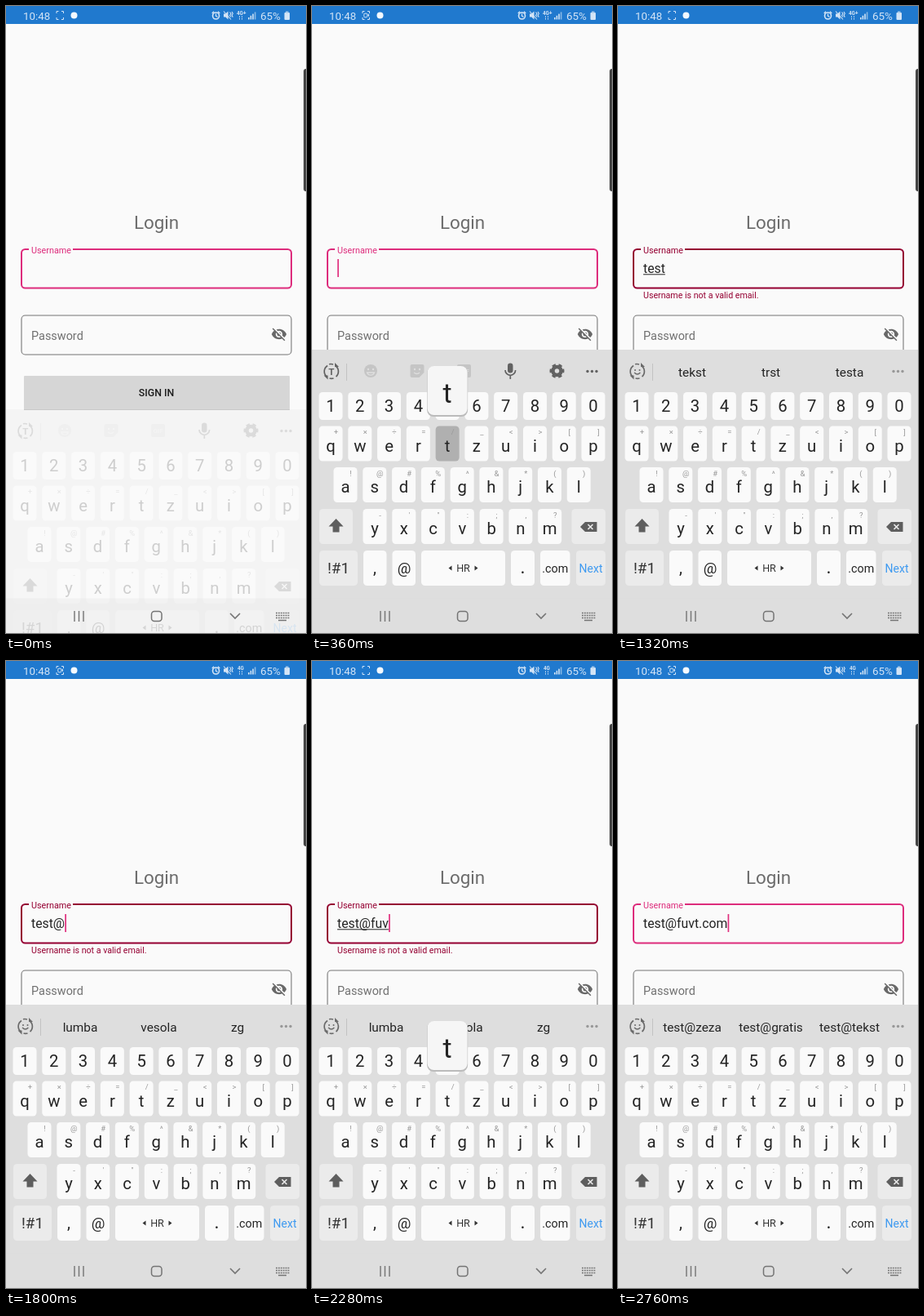
Recreate the animation shown at these times as an HTML page. Size 368 by 768 pixels, loop 2880 ms.

```html
<!DOCTYPE html>
<html lang="en">
<head>
<meta charset="utf-8">
<title>Login form</title>
<style>
html, body { margin: 0; width: 100%; height: 100%; overflow: hidden; background: #fafafa; }
svg { display: block; width: 368px; height: 768px; font-family: Roboto, sans-serif; }
</style>
</head>
<body>
<svg id="stage" viewBox="0 0 368 768" xmlns="http://www.w3.org/2000/svg"></svg>
<script>
const STEP = 120, STEPS = 24;
const PINK = '#dd2c7c', ERROR = '#950032', INK = '#242424', BOARD = '#dedede';

const rect = (x, y, w, h, fill, r = 0, more = '') =>
  `<rect x="${x}" y="${y}" width="${w}" height="${h}" rx="${r}" fill="${fill}" ${more}/>`;
const text = (s, x, y, size, fill, anchor = 'middle', more = '') =>
  `<text x="${x}" y="${y}" font-size="${size}" fill="${fill}" text-anchor="${anchor}" ${more}>${
    s.replace(/&/g, '&amp;').replace(/</g, '&lt;')}</text>`;
const line = (d, stroke, w = 1, more = '') =>
  `<path d="${d}" fill="none" stroke="${stroke}" stroke-width="${w}" ${more}/>`;
const shape = (d, fill, more = '') => `<path d="${d}" fill="${fill}" ${more}/>`;
const dot = (x, y, r, fill, more = '') => `<circle cx="${x}" cy="${y}" r="${r}" fill="${fill}" ${more}/>`;
const group = (id, body, more = '') => `<g id="${id}" ${more}>${body}</g>`;
const range = n => [...Array(n).keys()];

// Status bar
function statusBar() {
  const c = '#d3e4f6';
  return rect(0, 0, 368, 22, '#2079ce') +
    text('10:48', 21, 16.5, 13.3, c, 'start') +
    line('M62 9V6.5H64.5M68 6.5H70.5V9M70.5 14V16.5H68M64.5 16.5H62V14', c, 1) +
    group('cam', rect(63.8, 9.2, 4, 4.6, 'none', 1, `stroke="${c}"`) + shape('M68 11l2-1.5v4z', c)) +
    dot(83.5, 11.5, 4, '#f4f9ff') +
    dot(257.5, 12, 4, 'none', `stroke="${c}" stroke-width="1.6"`) +
    line('M257.5 9.5V12.2L259.5 13.5M252.7 9L255 6.8M262.3 9L260 6.8', c, 1.3) +
    shape('M267 9.5h2.3l3.2-3v10l-3.2-3H267z', c) +
    line('M267 6.5l9 10M274.5 7.5l1.5 2-1.5 2 1.5 2M277 7l1.3 2.2-1.3 2.2 1.3 2.2', c, 1.1) +
    text('4G+', 283, 11, 6.3, c, 'start', 'id="net" font-weight="700"') +
    line('M286.5 12.5V16.5M289.5 12.5V16.5', c, 1, 'stroke-dasharray="1.5 1"') +
    range(4).map(i => rect(297 + i * 2.6, 14 - i * 2.2, 1.6, 2.5 + i * 2.2, c, 0, i > 2 ? 'opacity=".6"' : '')).join('') +
    text('65%', 312, 16.5, 13.4, c, 'start') +
    rect(341.5, 8, 6.5, 9, c, 1) + rect(343, 6.5, 3.5, 2, '#9fc5ea');
}

// Form
const EYE = 'M12 7c2.8 0 5 2.2 5 5 0 .7-.1 1.3-.4 1.8l3 3c1.5-1.3 2.7-2.9 3.4-4.8-1.7-4.4-6-7.5-11-7.5' +
  '-1.4 0-2.7.2-4 .7l2.2 2.2C10.700 7.100 11.300 7 12 7zM2 4.300l2.700 2.700C3.100 8.300 1.800 10 1 12' +
  'c1.700 4.400 6 7.500 11 7.500 1.500 0 3-.3 4.400-.8L19.700 22 21 20.700 3.300 3z' +
  'M7.500 9.800l1.600 1.600c-.1.200-.1.400-.1.600 0 1.700 1.300 3 3 3 .2 0 .4 0 .6-.1l1.600 1.600' +
  'c-.7.300-1.400.500-2.200.500-2.800 0-5-2.200-5-5 0-.8.200-1.500.500-2.200zM11.800 9l3.200 3.200c.1-1.700-1.300-3.200-3.200-3.200z';

function form() {
  return rect(365, 77, 6, 150, '#444', 3) +
    text('Login', 184.5, 272.500, 22.4, '#6c6c6c') +
    rect(19, 298, 331, 47.500, 'none', 4.500, `id="box" stroke-width="2"`) +
    rect(28, 295, 54, 6, '#fafafa') +
    text('Username', 31, 303, 10.800, PINK, 'start', 'id="label"') +
    text('', 31, 327, 15.800, INK, 'start', 'id="value"') +
    rect(31, 328.300, 0, 1, INK, 0, 'id="under"') +
    rect(31, 310, 1.700, 22, '#e0307e', 0, 'id="caret"') +
    text('Username is not a valid email.', 31, 358, 10.650, ERROR, 'start', 'id="warn"') +
    rect(19, 379, 331, 48, 'none', 4.500, 'stroke="#777" stroke-width="1.1"') +
    text('Password', 31, 409, 14.450, '#707070', 'start') +
    shape(EYE, '#686868', 'transform="translate(325 392) scale(.83)"') +
    rect(22, 453, 326, 41.500, '#d6d6d6', 1) + rect(22, 494, 326, 1, '#c4c4c4') +
    text('SIGN IN', 184.500, 478, 12.300, '#1c1c1c', 'middle', 'font-weight="500"');
}

// Keyboard
const keys = {};

function key(name, x, y, w, h, fill = '#fafafa') {
  keys[name] = { cx: x + w / 2, y, w };
  return rect(x, y, w, h, fill, 4.500, `id="key-${name}"`);
}

function row(chars, hints, x0, y, h) {
  return [...chars].map((ch, i) => {
    const cx = x0 + i * 35.780;
    return key(ch, cx - 14.500, y, 29, h) +
      text(ch, cx, hints ? y + 31 : y + 24, 20.300, INK) +
      (hints ? text(hints[i], cx + 6.500, y + 10.500, 9.500, '#999') : '');
  }).join('');
}

const spinner = c =>
  line('M18 454a8.500 8.500 0 0 1 1-13.500M28.500 440.500a8.500 8.500 0 0 1 1 13.500', c, 1.700) +
  line('M21 438.800a8.500 8.500 0 0 1 5 .2M21.500 456a8.500 8.500 0 0 0 5 0', c, 1.700) +
  shape('M28 437v5h5zM19.500 457.500v-5h-5z', c);
const dots = c => [338, 343.500, 349].map(x => dot(x, 447.500, 1.700, c)).join('');

function tools() {
  const pale = '#c5c5c5', c = '#626262';
  return spinner(c) + text('T', 23.700, 452, 11.500, c, 'middle', 'font-weight="700"') +
    dot(72, 447, 8, pale) + dot(69, 445, 1.200, BOARD) + dot(75, 445, 1.200, BOARD) +
    line('M67.500 449a4.800 4.800 0 0 0 9 0z', BOARD, 1.300) +
    shape('M122.500 439h13a2 2 0 0 1 2 2v8l-6 6h-9a2 2 0 0 1-2-2v-12a2 2 0 0 1 2-2z', pale) +
    dot(126, 445, 1.200, BOARD) + dot(132, 445, 1.200, BOARD) + line('M125 449q4 3 7 0', BOARD, 1.300) +
    rect(178, 439, 17, 16, pale, 2) + text('GIF', 186.500, 450, 8, BOARD, 'middle', 'font-weight="700"') +
    rect(240, 437.500, 6.500, 12, c, 3.200) + line('M237 446a6.300 6.300 0 0 0 12.600 0M243.300 452v5', c, 1.700) +
    dot(300.500, 447, 5, 'none', `stroke="${c}" stroke-width="4.500"`) +
    dot(300.500, 447, 7.700, 'none', `stroke="${c}" stroke-width="2.600" stroke-dasharray="4.500 3.563" transform="rotate(-17 300.500 447)"`) +
    dots(c);
}

function suggestions() {
  const c = '#6a6a6a';
  return spinner(c) + dot(21, 446, 1, c) + dot(26.500, 446, 1, c) + line('M20 449q3.700 4 7.400 0', c, 1.300) +
    [91, 187.500, 284].map((x, i) => text('', x, 453.500, 15.400, INK, 'middle', `id="word${i}"`)).join('') +
    dots('#989898');
}

function keyboard() {
  const side = '#ebebeb', c = '#5e5e5e';
  return rect(0, 421, 368, 347, BOARD) + line('M42.500 438V459', '#c2c2c2') +
    group('tools', tools()) + group('words', suggestions()) +
    row('1234567890', '', 23, 473, 34) +
    row('qwertzuiop', '+×÷=/_<>[]', 23, 514.500, 43) +
    row('asdfghjkl', '!@#%^&*()', 41, 565, 43) +
    row('yxcvbnm', '-\'":;,?', 77, 616, 43) +
    key('shift', 9, 616, 41, 43, side) + shape('M29.500 628l9 9.500h-5v7h-8v-7h-5z', c) +
    key('back', 318.500, 616, 41.500, 43, side) + shape('M335 632h14.500v12H335l-6-6z', c) +
    line('M338.500 635l6 6M344.500 635l-6 6', side, 1.600) +
    key('sym', 9, 667, 47, 43, side) + text('!#1', 32.500, 695, 18.800, '#333') +
    key('comma', 63, 667, 28.500, 43) + text(',', 77, 695, 20, INK) +
    key('at', 98.500, 667, 28.500, 43) + text('@', 113, 694.500, 18.500, INK) +
    key('space', 134, 667, 103, 43) + text('HR', 185.500, 693, 12.600, '#333') +
    shape('M171.500 685.500v6l-4-3zM199.500 685.500v6l4-3z', '#333') +
    key('dot', 244, 667, 29, 43) + text('.', 258.500, 695, 23, INK) +
    key('com', 280, 667, 36.500, 43) + text('.com', 298.300, 693.500, 14.300, INK) +
    key('next', 324, 667, 36, 43, side) + text('Next', 342, 693.500, 14, '#3f9af0');
}

function navBar() {
  const c = '#747474';
  return rect(0, 725.500, 368, 43, BOARD, 0, 'id="navBg"') +
    line('M84 741V754M89.500 741V754M95 741V754', c, 1.400) +
    rect(178.500, 741.500, 12.500, 12, 'none', 3.500, `stroke="${c}" stroke-width="1.500"`) +
    line('M275 744l6 6 6-6', c, 1.600) +
    [743.500, 746.500, 749.500].map(y => line(`M331 ${y}H347.500`, c, 1.700, 'stroke-dasharray="1.900 1"')).join('') +
    line('M334 752.500H344', c, 1.500);
}

function popup() {
  return rect(0, 0, 49, 61, '#bbb', 8, 'id="popShade"') + rect(0, 0, 49, 60, '#f6f6f6', 8, 'id="popBox"') +
    text('', 0, 45, 35, INK, 'middle', 'id="popText"');
}

const stage = document.getElementById('stage');
stage.innerHTML = form() + group('board', keyboard()) + navBar() + group('pop', popup()) + statusBar();
const $ = id => document.getElementById(id);
const set = (id, attrs) => Object.entries(attrs).forEach(([k, v]) => $(id).setAttribute(k, v));
const show = (id, on) => set(id, { visibility: on ? 'visible' : 'hidden' });

// Each entry holds from its step on: [step, typed text, pressed key]
const typing = [
  [0, '', ''], [3, '', 't'], [4, 't', 't'], [5, 'te', 'e'], [6, 'tes', 's'], [7, 'tes', 't'],
  [8, 'test', ''], [12, 'test', 'at'], [13, 'test@', 'at'], [14, 'test@', ''],
  [16, 'test@f', 'f'], [17, 'test@fu', 'u'], [18, 'test@fuv', 'v'], [19, 'test@fuv', 't'],
  [20, 'test@fuvt', 't'], [21, 'test@fuvt', 'com'], [22, 'test@fuvt.com', 'com'], [23, 'test@fuvt.com', '']
];
const hintWords = [
  [9, 'tekst', 'trst', 'testa'], [14, 'lumba', 'vesola', 'zg'],
  [21, 'test@zeza', 'test@gratis', 'test@tekst']
];
const current = (list, n) => list.filter(e => e[0] <= n).pop();
const within = (n, ...spans) => spans.some(([a, b]) => n >= a && n <= b);
const caps = { at: '@', com: '.com' };

function drawPopup(name) {
  show('pop', name);
  if (!name) return;
  const { cx, y, w } = keys[name], pw = w + 20, x = cx - pw / 2;
  set('popShade', { x: x - .5, y: y - 73, width: pw + 1, height: 61.500 });
  set('popBox', { x, y: y - 73.500, width: pw });
  set('popText', { x: cx, y: y - 29, 'font-size': name === 'com' ? 23 : 34 });
  $('popText').textContent = caps[name] || name;
}

function draw(n) {
  const [, value, pressed] = current(typing, n);
  const words = current(hintWords, n);
  const bad = n >= 4 && n < 22, tint = bad ? ERROR : PINK;

  const shift = n === 0 ? 73 : n === 1 ? 16 : 0;
  set('board', { transform: `translate(0 ${shift})`, opacity: n === 0 ? .2 : n === 1 ? .75 : 1 });
  set('navBg', { opacity: n === 0 ? .3 : 1 });

  set('box', { stroke: tint });
  set('label', { fill: tint });
  show('warn', bad);
  $('value').textContent = value;
  const width = value ? $('value').getComputedTextLength() : 0;
  set('under', { width: within(n, [4, 12], [16, 21]) ? width : 0 });
  set('caret', { x: 31.200 + width });
  show('caret', n > 0 && !within(n, [11, 12]));

  show('tools', !words);
  show('words', words);
  if (words) range(3).forEach(i => $('word' + i).textContent = words[i + 1]);
  set('key-t', { fill: n === 3 ? '#b0b0b0' : '#fafafa' });
  set('key-at', { fill: n === 12 ? '#b0b0b0' : '#fafafa' });
  drawPopup(pressed);

  show('cam', within(n, [2, 5], [12, 15], [20, 23]));
  $('net').textContent = n < 12 ? '4G+' : '4G';
  set('net', { x: n < 12 ? 283 : 284 });
}

const start = performance.now();
function tick(now) {
  draw(Math.floor(Math.max(0, now - start) / STEP) % STEPS);
  requestAnimationFrame(tick);
}
draw(0);
requestAnimationFrame(tick);
</script>
</body>
</html>
```
